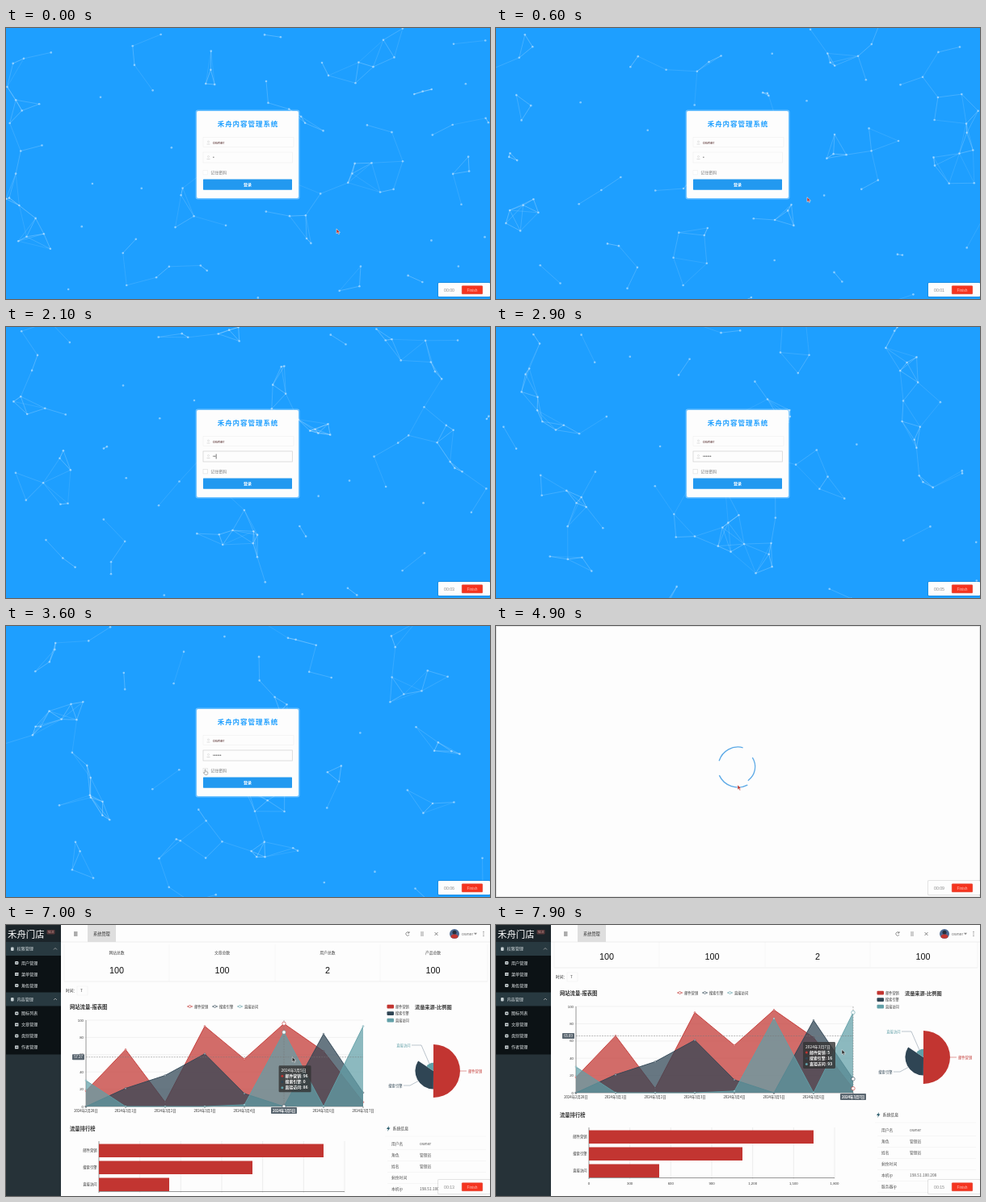
Recreate the animation shown at these times as an HTML page with a canvas. Size 599 px wide and 336 px high, loop 8 s.

```html
<!DOCTYPE html>
<html lang="zh">
<head>
<meta charset="utf-8">
<title>后台登录</title>
<style>
html, body { margin: 0; width: 100%; height: 100%; overflow: hidden; background: #fdfdfd; }
canvas, svg { position: absolute; left: 0; top: 0; width: 599px; height: 336px; display: block; }
text { font-family: "Noto Sans CJK SC", "Noto Sans CJK", "Liberation Sans", sans-serif; white-space: pre; }
.num { font-family: "Liberation Sans", "Noto Sans CJK SC", sans-serif; }
</style>
</head>
<body>
<canvas id="net" width="599" height="336"></canvas>
<svg id="ui" viewBox="0 0 599 336"></svg>
<script>
const LOOP = 8000, LOADING = 4400, READY = 5300;
const RED = '#c23531', NAVY = '#2f4554', TEAL = '#61a0a8', BLUE = '#1e9fff';
const $ = id => document.getElementById(id);
const clamp = v => Math.max(0, Math.min(1, v));
const mix = (a, b, k) => a + (b - a) * k;
const easeOut = k => 1 - (1 - k) ** 3;

// ---- drifting network: straight paths that wrap around the stage ----
const LINK = 42, PAD = 8, SPEED = 100;
let seed = 20;
const rand = () => (seed = seed * 16807 % 2147483647) / 2147483647;
const particles = Array.from({ length: 105 }, () => ({
  x: rand() * 599, y: rand() * 336, vx: (rand() - .5) * SPEED, vy: (rand() - .5) * SPEED
}));
const wrap = (v, size) => {
  const span = size + 2 * PAD;
  return ((v + PAD) % span + span) % span - PAD;
};

const ctx = $('net').getContext('2d');
function drawNet(t) {
  ctx.fillStyle = BLUE;
  ctx.fillRect(0, 0, 599, 336);
  ctx.lineWidth = .6;
  const dots = particles.map(p => [wrap(p.x + p.vx * t / 1000, 599), wrap(p.y + p.vy * t / 1000, 336)]);
  dots.forEach(([x, y], n) => {
    ctx.fillStyle = 'rgba(255,255,255,.45)';
    ctx.beginPath(); ctx.arc(x, y, 1.3, 0, 7); ctx.fill();
    for (const [x2, y2] of dots.slice(n + 1)) {
      const d = Math.hypot(x - x2, y - y2);
      if (d > LINK) continue;
      ctx.strokeStyle = `rgba(255,255,255,${.15 + .45 * (1 - d / LINK)})`;
      ctx.beginPath(); ctx.moveTo(x, y); ctx.lineTo(x2, y2); ctx.stroke();
    }
  });
}

// ---- markup helpers; text is placed by its vertical centre ----
const text = (x, y, s, size, fill = '#333', anchor = 'start', more = '') =>
  `<text x="${x}" y="${(y + size * .36).toFixed(2)}" font-size="${size}" fill="${fill}" text-anchor="${anchor}" ${more}>${s}</text>`;
const rect = (x, y, w, h, fill, more = '') => `<rect x="${x}" y="${y}" width="${w}" height="${h}" fill="${fill}" ${more}/>`;
const line = (x1, y1, x2, y2, stroke = '#eee', w = .5, more = '') =>
  `<path d="M${x1} ${y1}L${x2} ${y2}" stroke="${stroke}" stroke-width="${w}" ${more}/>`;
const ring = (x, y, r, stroke, fill = '#fff', w = .6) =>
  `<circle cx="${x}" cy="${y}" r="${r}" stroke="${stroke}" stroke-width="${w}" fill="${fill}"/>`;
const each = (list, f) => list.map(f).join('');
const BOLD = 'font-weight="bold"';

const login = `<g id="login">
  ${rect(234.5, 101.5, 129, 111, '#fff', 'rx="3" opacity=".35"')}
  ${rect(236, 103, 126, 108, '#fdfdfd', 'rx="2"')}
  ${text(299.5, 119, '禾舟内容管理系统', 8.5, BLUE, 'middle', BOLD + ' letter-spacing=".95"')}
  ${rect(244, 135.5, 112, 12, 'none', 'stroke="#f0f0f0" stroke-width=".6"')}
  ${rect(244, 154, 110.3, 13, '#fdfdfd', 'id="field" stroke-width=".7"')}
  ${each([142, 160.5], y => ring(250.5, y - 1, 1, '#d4d4d4', 'none') + line(248.5, y + 2, 252.5, y + 2, '#d4d4d4', .8))}
  ${text(256, 142, 'owner', 5.2, '#5b3434', 'start', 'class="num"')}
  <text id="secret" class="num" x="256" y="162.3" font-size="5" fill="#666"></text>
  ${rect(0, 157.5, .6, 6, '#222', 'id="caret"')}
  ${rect(244, 176.3, 5.6, 5.6, '#fff', 'id="check" stroke-width=".6"')}
  <path id="tick" d="M245.2 179l1.2 1.4 2.2-2.8" fill="none" stroke="${BLUE}" stroke-width=".8"/>
  ${text(253.5, 179.3, '记住密码', 4.9, '#777')}
  ${rect(244, 187.5, 110, 13.2, '#2299f0', 'rx=".6"')}
  ${text(299, 194.2, '登录', 5, '#fff', 'middle', BOLD)}
</g>`;

// ---- loader ----
const arc = (r, a, b) => {
  const pt = d => [r * Math.cos(d * Math.PI / 180), r * Math.sin(d * Math.PI / 180)].map(v => v.toFixed(2)).join(' ');
  return `<path d="M${pt(a)}A${r} ${r} 0 0 1 ${pt(b)}" fill="none" stroke="#5ba9e6" stroke-width="1.3"/>`;
};
const loader = `<g id="loader">${rect(.5, .5, 598, 335, '#fdfdfd', 'stroke="#e4e4e4"')}
  <g id="spin">${arc(24.5, 197, 284)}${arc(21.2, -33, 54)}${arc(25.5, 62, 155)}</g></g>`;

// ---- dashboard ----
const days = ['2月28日', ...Array.from({ length: 7 }, (_, i) => `3月${i + 1}日`)].map(d => '2024年' + d);
const series = [
  { name: '邮件营销', color: RED, data: [18, 66, 5, 93, 55, 96, 64, 5], total: 1646 },
  { name: '搜索引擎', color: NAVY, data: [0, 21, 36, 61, 15, 0, 84, 16], total: 1125 },
  { name: '直接访问', color: TEAL, data: [30, 0, 0, 0, 2, 86, 0, 93], total: 515 }
];
const dayX = i => 99 + 49 * i;
const valY = v => 225 - 1.07 * v;
const steps = (n, size) => Array.from({ length: n }, (_, i) => i * size);

const area = ({ color, data }) => {
  const top = data.map((v, i) => `${dayX(i)} ${valY(v)}`).join('L');
  return `<path d="M99 225L${top}L442 225Z" fill="${color}" opacity=".72"/>
    <path d="M${top}" fill="none" stroke="${color}" stroke-width=".9"/>` +
    each(data, (v, i) => ring(dayX(i), valY(v), .9, color));
};
const lineChart = text(79, 101.5, '网站流量-报表图', 6.3, '#333', 'start', BOLD) +
  each(series, (s, i) => line(224 + 31 * i, 101, 231 + 31 * i, 101, s.color, .8) +
    ring(227.5 + 31 * i, 101, 1.5, s.color) + text(233 + 31 * i, 101, s.name, 4.3)) +
  each(steps(6, 20), v => line(97, valY(v), 442, valY(v), v ? '#e2e2e2' : '#333') +
    text(96, valY(v), v, 4.3, '#333', 'end', 'class="num"')) +
  line(99, 118, 99, 225, '#333') +
  `<g clip-path="url(#reveal)">${each(series, area)}</g>` +
  each(days, (d, i) => line(dayX(i), 225, dayX(i), 227, '#333') + text(dayX(i), 230, d, 4.3, '#333', 'middle'));

const sum = series.reduce((a, s) => a + s.total, 0);
let turn = -Math.PI / 2;
const slices = each(series, ({ color, total }) => {
  const r = 33 * total / series[0].total, end = turn + total / sum * 2 * Math.PI;
  const d = `M0 0L${r * Math.cos(turn)} ${r * Math.sin(turn)}A${r} ${r} 0 ${end - turn > Math.PI ? 1 : 0} 1 ${r * Math.cos(end)} ${r * Math.sin(end)}Z`;
  turn = end;
  return `<path d="${d}" fill="${color}"/>`;
});
const pie = text(506, 101.5, '流量来源-比例图', 6.2, '#333', 'start', BOLD) +
  each(series, (s, i) => rect(471.5, 98.8 + 8.5 * i, 8.5, 4.6, s.color, 'rx="1"') + text(482, 101 + 8.5 * i, s.name, 4.2)) +
  `<g id="pie">${slices}</g>` +
  line(562, 181, 570, 181, RED) + text(572, 181, '邮件营销', 4.3, RED) +
  `<path d="M524 172L514 149H502M511 193L500 199H492" fill="none" stroke="#789" stroke-width=".5"/>` +
  text(500.5, 149, '直接访问', 4.3, TEAL, 'end') + text(490.5, 199, '搜索引擎', 4.3, NAVY, 'end');

const barX = v => 115 + v * 304 / 1800;
const bars = text(79, 253, '流量排行榜', 6.3, '#333', 'start', BOLD) +
  each(steps(7, 300), v => line(barX(v), 268, barX(v), 332, v ? '#ddd' : '#333') +
    text(barX(v), 337, v.toLocaleString('en-US'), 4.3, '#333', 'middle', 'class="num"')) +
  line(115, 330.5, 419, 330.5, '#333') +
  `<g id="bars">${each(series, (s, i) => rect(115, 271.5 + 21 * i, barX(s.total) - 115, 16.5, RED))}</g>` +
  each(series, (s, i) => text(112.5, 279.8 + 21 * i, s.name, 4.3, '#333', 'end'));

const info = [['用户名', 'owner'], ['角色', '管理员'], ['姓名', '管理员'], ['剩余时间', ''], ['本机ip', '198.51.100.208'], ['服务器ip', '']];
const details = `<path d="M474 249l-3 4h2l-1 3 3.4-4.4h-2z" fill="#256"/>` + text(478.5, 252.5, '系统信息', 4.9) +
  line(469, 262, 594, 262) + each(info, ([k, v], i) => text(477, 271.5 + 14 * i, k, 4.8, '#555') +
    text(512, 271.5 + 14 * i, v, 4.8, '#555') + line(472, 278.5 + 14 * i, 594, 278.5 + 14 * i));

const stats = each([['网站总数', 100], ['文章总数', 100], ['用户总数', 2], ['产品总数', 100]], ([k, v], i) =>
  text(137 + 130.5 * i, 34, k, 4.8, '#444', 'middle') +
  text(137 + 130.5 * i, 56, v, 10.8, '#111', 'middle', 'class="num"')) +
  line(72, 70, 596, 70, '#ddd') + line(72, 24, 72, 70) + line(596, 24, 596, 70) +
  each([202, 333, 463], x => line(x, 24, x, 70, '#f1f1f1')) +
  text(74, 81.5, '时间：', 4.8) + rect(88, 76, 13, 11, 'none', 'stroke="#eee" stroke-width=".5"') + text(92, 81.5, '7', 4.6);

const hover = `<g id="hover">
  <path id="cross" stroke="#777" stroke-width=".5" stroke-dasharray="2 1.2" fill="none"/>
  <g id="rings">${each(series, s => ring(0, 0, 2.2, s.color))}</g>
  <g id="dayTag">${rect(-16, 226, 32, 8, '#5a6670', 'rx=".8"')}${text(0, 230, '', 4.3, '#fff', 'middle', BOLD)}</g>
  <g id="valTag">${rect(82, -3.5, 15, 7, '#5a6670', 'rx=".8"')}${text(89.5, 0, '', 4.3, '#fff', 'middle')}</g>
  <g id="tip">${rect(0, 0, 40, 33, '#323232', 'rx="1.4" opacity=".8"')}${text(3, 5.8, '', 4.9, '#fff')}
    ${each(series, (s, i) => `<circle cx="4.3" cy="${13 + 7.2 * i}" r="1.5" fill="${s.color}"/>` + text(8, 13 + 7.2 * i, '', 4.9, '#fff', 'start', BOLD))}</g>
</g>`;

const group = (y, s) => rect(0, y - 8.5, 68, 17, '#283940') + rect(6, y - 2, 3.6, 4.5, '#c5ced2', 'rx="1"') +
  text(13.5, y, s, 5.1, '#d5dcdf') + `<path d="M59 ${y + 1}l2-2 2 2" fill="none" stroke="#bbb" stroke-width=".7"/>`;
const entries = (y, names) => rect(0, y - 9, 68, 14 * names.length + 4, '#0c1215') +
  each(names, (s, i) => rect(11, y - 2 + 14 * i, 4.4, 4, '#cfd6d9', `rx="${i % 2 ? .2 : 1.2}"`) +
    line(11.8, y + 14 * i, 14.6, y + 14 * i, '#0c1215', .7) + text(19, y + 14 * i, s, 5.1, '#dfe4e6'));
const sidebar = rect(0, 0, 68, 336, '#263238') + rect(0, 0, 68, 21, '#1b2429') +
  text(2, 11.5, '禾舟门店', 11.4, '#fff') + rect(50.5, 6, 10, 5.4, '#57383a', 'rx=".8"') + text(55.5, 8.7, 'V1.0', 3.4, '#e5b5b0', 'middle') +
  group(29.5, '权限管理') + entries(47, ['用户管理', '菜单管理', '角色管理']) +
  group(92, '内容管理') + entries(109.5, ['图标列表', '文章管理', '类别管理', '作者管理']);

const header = rect(68, 0, 531, 21, '#fdfdfd') + line(68, 21, 599, 21, '#ddd') +
  each([9, 11, 13], y => line(84, y, 88.5, y, '#333', .8) + line(513, y, 517, y, '#777', .7)) +
  rect(101, 0, 35, 21, '#dedede') + text(108, 11, '系统管理', 5.2) +
  `<path d="M499 10a2.2 2.2 0 1 0 0 2M499 8v2h-2" fill="none" stroke="#555" stroke-width=".6"/>` +
  `<path d="M530.5 9l4 4M534.5 9l-4 4" stroke="#555" stroke-width=".7"/>` +
  ring(555, 11, 6, '#335', '#4d6a94', 0) + `<circle cx="555" cy="9.2" r="2.5" fill="#26303f"/><path d="M550.5 15a4.5 3.6 0 0 1 9 0l-2 1.4h-5z" fill="${RED}"/>` +
  text(564, 11, 'owner', 5.2, '#777', 'start', 'class="num"') + '<path d="M579 9.8h4l-2 2.4z" fill="#888"/>' +
  each([8.7, 11, 13.3], y => `<circle cx="591" cy="${y}" r=".6" fill="#555"/>`);

const dashboard = `<g id="dash">${rect(0, 0, 599, 336, '#fdfdfd')}
  <g id="page">${stats}${lineChart}${pie}${bars}${details}${hover}</g>${header}${sidebar}</g>`;

const recorder = rect(534, 315, 66, 19, '#000', 'rx="1.5" opacity=".1"') + rect(535, 316, 64, 17, '#fdfdfd', 'rx="1"') +
  '<text id="clock" class="num" x="542" y="326.9" font-size="5.2" fill="#888"></text>' +
  rect(564.3, 319.8, 25.4, 9.9, '#f5341f', 'rx=".6" stroke="#dc3a28" stroke-width=".6"') +
  text(577, 324.8, 'Finish', 4.9, '#ffc4ba', 'middle', 'class="num"');

$('ui').innerHTML = `<defs><clipPath id="reveal"><rect id="revealBox" x="96" y="110" width="0" height="118"/></clipPath></defs>
  ${login}${loader}${dashboard}${recorder}
  <g id="mouse" stroke="#fff" stroke-width=".5">
    <path id="arrow" d="M0 0v6l1.5-1.3 1.1 2.2 1-.5-1-2.1h1.9z"/>
    <path id="hand" d="M0 0.5a.6.6 0 0 1 1.2 0v2l2.6.7v2l-.8 1.3h-2.6l-2-2.6.6-.5 1 .7z" fill="#fff" stroke="#666"/>
  </g>`;

// ---- motion: pointer stops as time, x, y ----
const path = [[0, 409, 249], [1300, 357, 164], [1700, 300, 161], [3000, 300, 161], [3450, 246, 178], [3750, 246, 178],
  [4150, 299, 197], [READY, 299, 197], [5850, 99, 155], [6100, 132, 191.5], [7300, 428, 154.5], [LOOP, 428, 154.5]];
function mouseAt(t) {
  const i = Math.max(1, path.findIndex(p => p[0] > t));
  const [t0, x0, y0] = path[i - 1], [t1, x1, y1] = path[i];
  const k = clamp((t - t0) / (t1 - t0));
  return [mix(x0, x1, k), mix(y0, y1, k)];
}
const nearest = x => Math.max(0, Math.min(7, Math.round((x - 99) / 49)));
// Mean of f over the recent pointer path: a lagging follower.
const trail = (t, span, f) => {
  let total = 0;
  for (let i = 0; i < 20; i++) total += f(mouseAt(t - span * (i + .5) / 20));
  return total / 20;
};
const show = (id, on) => $(id).style.display = on ? '' : 'none';
const move = (el, x, y) => el.setAttribute('transform', `translate(${x} ${y})`);

function drawLogin(t) {
  drawNet(t);
  const count = t < 2000 ? 1 : Math.min(6, 2 + Math.floor((t - 2000) / 220));
  $('secret').textContent = '•'.repeat(count);
  $('caret').setAttribute('x', 256.3 + 1.75 * count);
  show('caret', t > 1500 && t < 3500 && Math.floor(t / 280) % 2);
  $('field').setAttribute('stroke', t < 1150 ? '#f0f0f0' : '#cfcfcf');
  $('check').setAttribute('stroke', t < 700 ? '#f0f0f0' : '#dcdcdc');
  show('tick', t > 3680);
}

function drawDash(t) {
  const grow = easeOut(clamp((t - READY) / 550));
  $('revealBox').setAttribute('width', 350 * grow);
  $('pie').setAttribute('transform', `translate(529 181) scale(${grow})`);
  $('bars').setAttribute('transform', `translate(115 0) scale(${grow} 1) translate(-115 0)`);
  move($('page'), 0, -17 * easeOut(clamp((t - 7450) / 300)));

  const [mx, my] = mouseAt(t);
  const on = t > 5700 && my > 118 && my < 225;
  show('hover', on);
  if (!on) return;
  const day = nearest(mx), x = trail(t, 140, p => dayX(nearest(p[0])));
  $('cross').setAttribute('d', `M${x} 118V225M99 ${my}H442`);
  series.forEach((s, i) => move($('rings').children[i], dayX(day), valY(s.data[day])));
  move($('dayTag'), x, 0);
  $('dayTag').lastChild.textContent = days[day];
  move($('valTag'), 0, my);
  $('valTag').lastChild.textContent = ((225 - my) / 1.07).toFixed(2);
  const tip = $('tip'), lines = tip.querySelectorAll('text');
  move(tip, trail(t, 200, p => p[0] + (p[0] > 418 ? -48 : 8)), trail(t, 200, p => p[1] + 7.5));
  lines[0].textContent = days[day];
  series.forEach((s, i) => lines[i + 1].textContent = `${s.name}: ${s.data[day]}`);
}

function drawMouse(t) {
  const overControl = t > 3350 && t < LOADING;
  move($('mouse'), ...mouseAt(t));
  show('mouse', t < 1700 || t > 3000);
  show('hand', overControl);
  show('arrow', !overControl);
  $('arrow').setAttribute('fill', t < READY ? '#b8322c' : '#222');
}

function frame(now) {
  const t = now % LOOP;
  show('login', t < LOADING);
  show('loader', t >= LOADING && t < READY);
  show('dash', t >= READY);
  if (t < LOADING) drawLogin(t);
  else if (t < READY) $('spin').setAttribute('transform', `translate(299.5 174.5) rotate(${(t - 4900) * .36})`);
  else drawDash(t);
  drawMouse(t);
  $('clock').textContent = '00:' + String(Math.floor(t * .0019)).padStart(2, '0');
}
const start = performance.now();
(function tick() {
  frame(performance.now() - start);
  requestAnimationFrame(tick);
})();
</script>
</body>
</html>
```
